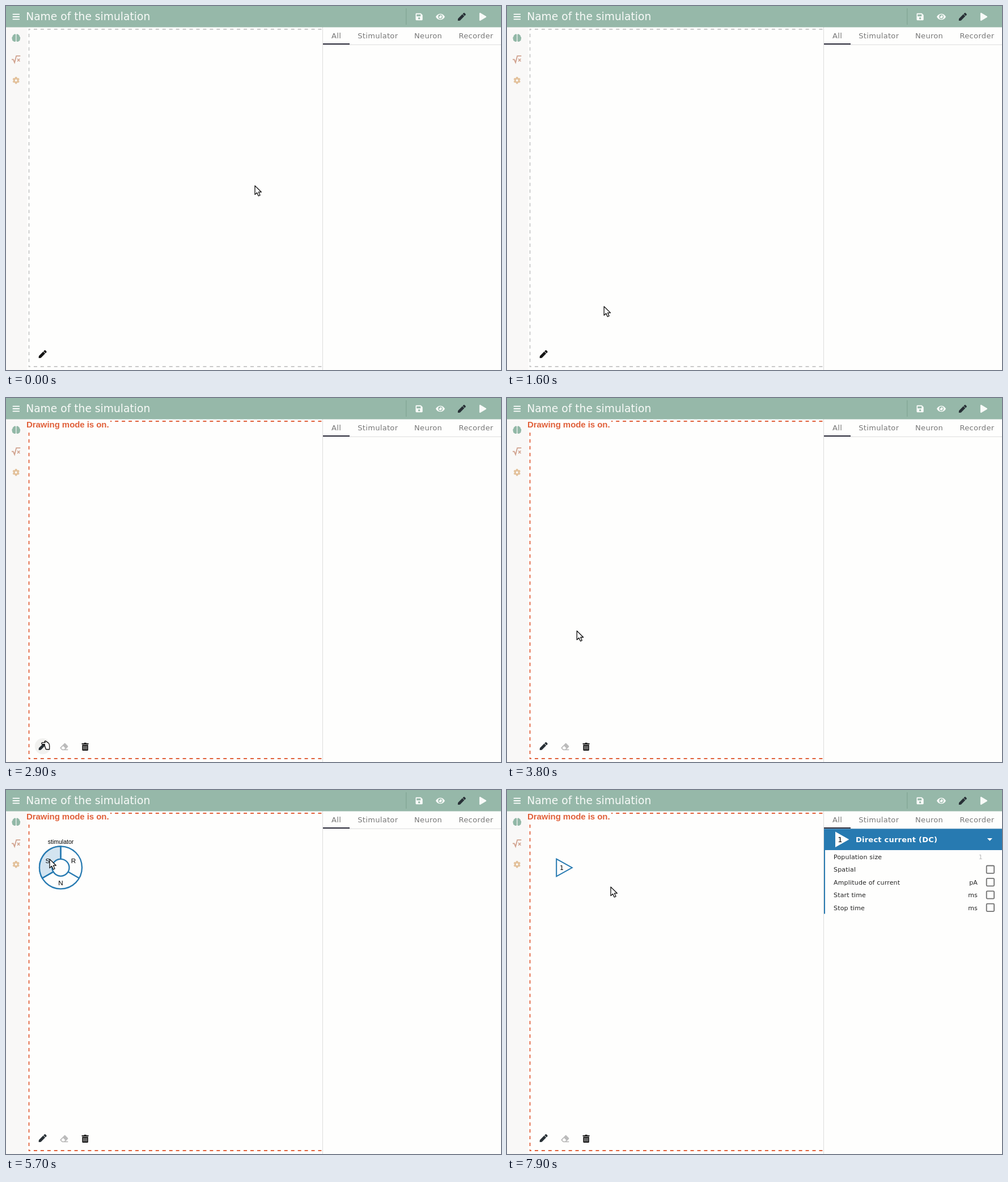
Animation, 873 px wide and 642 px high, one loop 8000 ms. Source, as an HTML page:

```html
<!DOCTYPE html>
<html lang="en">
<head>
<meta charset="utf-8">
<title>Drawing mode</title>
<style>
html, body { margin: 0; width: 100%; height: 100%; overflow: hidden; background: #fefefd; }
svg { display: block; width: 873px; height: 642px; font-family: "DejaVu Sans", sans-serif; }
.tab { font-size: 13px; letter-spacing: .33px; fill: #777; }
.row { font-size: 11px; letter-spacing: .18px; fill: #222; }
.arial { font-family: "Liberation Sans", Arial, sans-serif; }
.mid { text-anchor: middle; }
.end { text-anchor: end; }
</style>
</head>
<body>
<svg id="stage" viewBox="0 0 873 642"></svg>
<script>
const BLUE = '#277ab1', WHITE = '#fefefd';
const OUTER = 37.5, INNER = 15;   // radii of the ring menu

// Icon: width of its 512 high box, then its outline
const ICONS = {
  bars: [448, 'M12 60H436Q448 60 448 72V120Q448 132 436 132H12Q0 132 0 120V72Q0 60 12 60ZM12 220H436Q448 220 448 232V280Q448 292 436 292H12Q0 292 0 280V232Q0 220 12 220ZM12 380H436Q448 380 448 392V440Q448 452 436 452H12Q0 452 0 440V392Q0 380 12 380Z'],
  save: [448, 'M434 130l-84-84A48 48 0 0 0 316 32H48A48 48 0 0 0 0 80v352a48 48 0 0 0 48 48h352a48 48 0 0 0 48-48V164a48 48 0 0 0-14-34zM224 416a64 64 0 1 1 0-128 64 64 0 0 1 0 128zM320 111V212a12 12 0 0 1-12 12H76a12 12 0 0 1-12-12V108a12 12 0 0 1 12-12h229a12 12 0 0 1 8 3l4 4a12 12 0 0 1 3 8z'],
  eye: [576, 'M572 241C518 136 411 64 288 64S58 136 4 241a32 32 0 0 0 0 30C58 376 165 448 288 448s230-72 284-177a32 32 0 0 0 0-30zM288 400a144 144 0 1 1 0-288 144 144 0 0 1 0 288zm0-240a95 95 0 0 0-25 4 48 48 0 0 1-67 67A96 96 0 1 0 288 160z'],
  pen: [512, 'M291 93l128 128-278 278-114 13C11 514-2 501 0 485l13-114zM498 74l-60-60c-19-19-49-19-68 0l-57 57 128 128 57-57c19-19 19-49 0-68z'],
  play: [448, 'M424 215L72 7C44-10 0 6 0 48V464c0 38 41 60 72 41l352-208c32-18 32-64 0-82z'],
  eraser: [512, 'M498 274c19-19 19-49 0-68l-160-160c-19-19-49-19-68 0l-256 256c-19 19-19 49 0 68l96 96A48 48 0 0 0 144 480h356a12 12 0 0 0 12-12v-40a12 12 0 0 0-12-12H356zM195 211l138 138-68 67H151l-80-80z'],
  trash: [448, 'M32 464a48 48 0 0 0 48 48h288a48 48 0 0 0 48-48V128H32zm272-256a16 16 0 0 1 32 0v224a16 16 0 0 1-32 0zm-96 0a16 16 0 0 1 32 0v224a16 16 0 0 1-32 0zm-96 0a16 16 0 0 1 32 0v224a16 16 0 0 1-32 0zM432 32H312l-9-19A24 24 0 0 0 281 0H167a24 24 0 0 0-22 13L136 32H16A16 16 0 0 0 0 48v32a16 16 0 0 0 16 16h416a16 16 0 0 0 16-16V48a16 16 0 0 0-16-16z']
};

const icon = (name, x, y, fill) => {
  const [w, d] = ICONS[name];
  return `<path fill="${fill}" fill-rule="evenodd" d="${d}" transform="translate(${x} ${y}) scale(${14 / 512}) translate(${-w / 2} -256)"/>`;
};
const text = (x, y, str, cls = '', attrs = '') => `<text x="${x}" y="${y}" class="${cls}" ${attrs}>${str}</text>`;
const polar = (r, deg) => {
  const a = deg * Math.PI / 180;
  return `${96.5 + r * Math.cos(a)} ${136.8 + r * Math.sin(a)}`;
};
const lobe = '<path d="M17.2 50C14.8 48.8 13.6 50 13.5 51C11.7 51.5 11.5 53 11.8 53.8C10 55 10.1 57.3 10.9 58.4C10.6 60.4 12 61.8 13.3 61.9C14 63.5 16.2 63.4 17.2 62.3Z"/>';
const teeth = [30, 90, 150, 210, 270, 330]
  .map(a => `<path d="M3 0H6.2" transform="rotate(${a})"/>`).join('');
const spokes = [30, 150, 270].map(a => `M${polar(INNER, a)}L${polar(OUTER, a)}`).join('');
const row = (label, i, unit) => {
  const y = 122 + 22.4 * i;
  return text(576, y, label, 'row') + (unit === undefined ? '' :
    text(830, y, unit, 'row end') +
    `<rect x="845.7" y="${y - 10.9}" width="13.4" height="13.4" rx="1.5" fill="none" stroke="#717171" stroke-width="1.8"/>`);
};

stage.innerHTML = `
<rect width="873" height="642" fill="${WHITE}"/>
<rect y="37" width="37.5" height="605" fill="#f9f8f7"/>
<g fill="#92b8a7">${lobe}<g transform="matrix(-1 0 0 1 35.6 0)">${lobe}</g></g>
<g fill="none" stroke="#d0a18d" stroke-width="1.8">
  <path d="M10 94.3H12.8L15.1 99.8L18.2 88.1H25.3"/><path d="M20 93L24.4 97.7M24.4 93L20 97.7" stroke-width="1.5"/>
</g>
<g transform="translate(17.7 131.2)" fill="none" stroke="#e3c19b" stroke-width="3">
  <circle r="3.5"/>${teeth}
</g>

<g id="border" fill="none" stroke-width="1.8" stroke-dasharray="5.97" stroke-dashoffset="2.98">
  <path d="M40 41H560"/><path d="M40.5 40V637"/><path d="M40 636H560"/>
</g>
<circle id="hover" cx="64.8" cy="614.3" r="14" fill="#e3e3e1"/>
<g id="pen">${icon('pen', 64.6, 614, 'currentColor')}</g>
<g id="tools">
  <rect x="36" y="38" width="148" height="17" fill="${WHITE}"/>
  ${text(36, 52, 'Drawing mode is on.', 'arial', 'font-size="15" letter-spacing="-.06" font-weight="bold" fill="#e0603a"')}
  ${icon('eraser', 102.4, 615, '#bbb')}${icon('trash', 139.6, 615, '#151515')}
</g>
<g id="tip">
  <rect x="33" y="542" width="64.5" height="31" rx="3.5" fill="#6d6d6c"/>
  ${text(65.2, 561, 'Draw', 'mid', 'font-size="13" letter-spacing=".4" fill="#fff"')}
</g>

<g id="ring" class="arial mid" font-size="11.7">
  <g fill="${WHITE}" stroke="${BLUE}" stroke-width="2.3">
    <circle cx="96.5" cy="136.8" r="${OUTER}"/>
    <path id="sector" fill="#d3e4f0" d="M${polar(OUTER, 150)}A${OUTER} ${OUTER} 0 0 1 ${polar(OUTER, 270)}L${polar(INNER, 270)}A${INNER} ${INNER} 0 0 0 ${polar(INNER, 150)}Z"/>
    <circle cx="96.5" cy="136.8" r="${INNER}"/><path d="${spokes}"/>
  </g>
  ${text(73.5, 129, 'S')}${text(119, 129, 'R')}${text(96.5, 168, 'N')}
  <g id="kind">${text(96.5, 95, 'stimulator', '', 'font-size="10.5"')}</g>
</g>
<g id="node">
  <path d="M87.2 121.6L114.8 137L87.2 152.4Z" fill="${WHITE}" stroke="${BLUE}" stroke-width="2"/>
  ${text(96.5, 141, 1, 'mid', 'font-size="11"')}
</g>

<rect x="558.5" y="37" width="315" height="605" fill="${WHITE}"/>
<path d="M558.5 37V642M559 68.3H873" stroke="#dcdcdc" fill="none"/>
<rect x="559" y="66" width="47" height="2" fill="#2d2d3c"/>
${text(574, 57, 'All', 'tab')}${text(620.2, 57, 'Stimulator', 'tab')}
${text(720, 57, 'Neuron', 'tab')}${text(798.5, 57, 'Recorder', 'tab')}
<g id="panel">
  <rect x="559" y="68.4" width="314" height="37.6" fill="${BLUE}"/>
  <rect x="559" y="106" width="2" height="112.4" fill="${BLUE}"/>
  <path d="M579 73.5L603.3 87.2L579 101ZM846.8 85H856L851.4 89.7Z" fill="#fff"/>
  ${text(587.3, 92, 1, 'mid', 'font-size="13"')}
  ${text(615, 92, 'Direct current (DC)', '', 'font-size="13" font-weight="bold" letter-spacing=".23" fill="#fff"')}
  ${row('Population size', 0)}${text(839, 122, 1, 'row end', 'style="fill:#bbb"')}
  ${row('Spatial', 1, '')}${row('Amplitude of current', 2, 'pA')}
  ${row('Start time', 3, 'ms')}${row('Stop time', 4, 'ms')}
</g>

<rect width="873" height="37.5" fill="#96b8a9"/>
<path d="M705.8 4V33" stroke="#7ca191" fill="none"/>
${icon('bars', 17.8, 19, '#fff')}${icon('save', 728.6, 19, '#f8faf8')}${icon('eye', 766, 19, '#f8faf8')}
${icon('pen', 803.8, 19, '#283036')}${icon('play', 841, 19, '#f8faf8')}
${text(35.2, 25, 'Name of the simulation', '', 'font-size="18.7" fill="#f8faf8"')}

<g id="cursor" stroke="#111" stroke-width="1.3" stroke-linejoin="round" fill="#fff">
  <path id="arrow" d="M1 1V16.6L4.6 13.2L7.2 19L10 17.8L7.5 12.2H12.4Z"/>
  <path id="hand" d="M-3.5 5Q-5.2 5-5.2 3.4T-3.5 1.8H1.5L0 .6Q.3-1.2 2.2-.6L6.6 2.6Q8.6 4.2 8.6 7.5V14H3.2Q1.4 13.4 2 11.4Q.2 10.6 1 8.6Q-.6 7.6 .4 5Z"/>
</g>`;

const $ = id => document.getElementById(id);
const show = (id, opacity) => $(id).setAttribute('opacity', +opacity);
const clamp = v => Math.max(0, Math.min(1, v));
const smooth = p => p * p * (3 - 2 * p);

// Pointer moves: start, length, end x, end y, easing, sideways bow in x and y
const MOVES = [
  [450, 1750, 70, 608.5, smooth, 0, 0],
  [2700, 400, 66, 603, smooth, 0, 0],
  [3495, 1305, 95, 135, p => 1 - (1 - p) ** 2, 46, 0],
  [5400, 300, 76, 121, smooth, 0, 0],
  [7020, 380, 150, 148, smooth, 0, -15],
  [7600, 300, 182, 170, smooth, 0, 0]
];

function pointer(t) {
  let x = 438, y = 316;
  for (const [start, length, endX, endY, ease, bowX, bowY] of MOVES) {
    const p = ease(clamp((t - start) / length)), bow = Math.sin(Math.PI * p);
    x += (endX - x) * p + bowX * bow;
    y += (endY - y) * p + bowY * bow;
  }
  return [x, y];
}

function draw(now) {
  const t = Math.floor(now % 8000 / 100) * 100;   // the screen updates ten times a second
  const drawing = t >= 2500, hand = t >= 2200 && t < 3500;
  $('border').setAttribute('stroke', drawing ? '#e0603a' : '#c9c9c9');
  $('pen').setAttribute('color', drawing ? '#283036' : '#151515');
  show('tools', drawing);
  show('hover', t >= 2200 ? clamp((3100 - t) / 400) : 0);
  show('tip', t === 2200 || t === 2500 ? .5 : t > 2200 && t < 2500);
  show('ring', t >= 5100 && t < 6800);
  show('sector', t >= 5600);
  show('kind', t >= 5600);
  show('node', t >= 6800);
  show('panel', t >= 6800);
  show('arrow', !hand);
  show('hand', hand);
  $('cursor').setAttribute('transform', `translate(${pointer(t)})`);
  requestAnimationFrame(draw);
}
requestAnimationFrame(draw);
</script>
</body>
</html>
```
